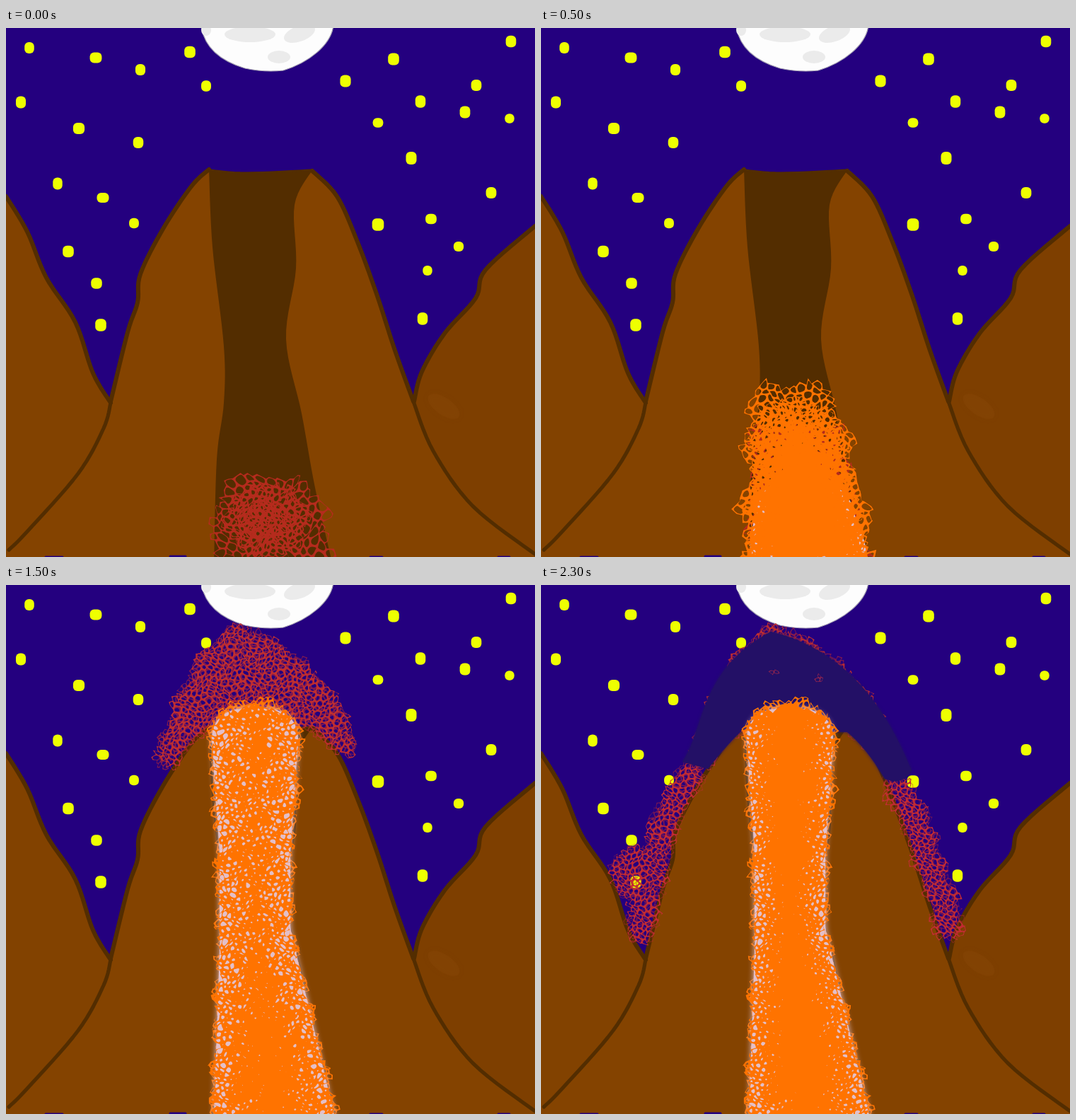
Recreate the animation shown at these times as an HTML page with a canvas. Size 748x748 px, loop 2.5 s.

```html
<!DOCTYPE html>
<html lang="en">
<head>
<meta charset="utf-8">
<title>Volcano</title>
<style>
  html, body { margin: 0; width: 100%; height: 100%; overflow: hidden; background: #24007f; }
  canvas { display: block; width: 748px; height: 748px; }
</style>
</head>
<body>
<canvas id="stage" width="748" height="748"></canvas>
<script>
const SIZE = 748, HOLD = 500;
const SKY = '#24007f', ORANGE = '#ff7300', RED = '#b52b1d', PALE = '#e3bfc8', DARK = '#532d00';
let ctx;

const clamp = (v, lo = 0, hi = 1) => Math.min(hi, Math.max(lo, v));
const hash = (x, y, seed = 0) => {
  const v = Math.sin(x * 12.9898 + y * 78.233 + seed * 37.719) * 43758.5453;
  return v - Math.floor(v);
};
const parse = s => s.split(' ').map(p => p.split(',').map(Number));

// Catmull-Rom curve through a few key points
function spline(s, steps = 8) {
  const p = parse(s), out = [p[0]];
  for (let i = 0; i < p.length - 1; i++) {
    const [a, b, c, d] = [p[i - 1] || p[i], p[i], p[i + 1], p[i + 2] || p[i + 1]];
    for (let j = 1; j <= steps; j++) {
      const t = j / steps;
      out.push([0, 1].map(k => b[k] + t / 2 * (c[k] - a[k] +
        t * (2 * a[k] - 5 * b[k] + 4 * c[k] - d[k] + t * (3 * (b[k] - c[k]) + d[k] - a[k])))));
    }
  }
  return out;
}

function trace(pts, path = new Path2D()) {
  pts.forEach((p, i) => i ? path.lineTo(...p) : path.moveTo(...p));
  return path;
}

// Closed curve rounded through the midpoints of its sides
function round(pts, path) {
  const mid = (a, b) => [(a[0] + b[0]) / 2, (a[1] + b[1]) / 2];
  path.moveTo(...mid(pts[pts.length - 1], pts[0]));
  pts.forEach((p, i) => path.quadraticCurveTo(...p, ...mid(p, pts[(i + 1) % pts.length])));
  path.closePath();
}

function ellipse(x, y, rx, ry, turn = 0) {
  const path = new Path2D();
  path.ellipse(x, y, rx, ry, turn, 0, 7);
  return path;
}

function fill(path, color, blur = 0) {
  ctx.save();
  ctx.fillStyle = ctx.shadowColor = color;
  ctx.shadowBlur = blur;
  ctx.fill(path);
  ctx.restore();
}

function line(path, color, width) {
  ctx.strokeStyle = color;
  ctx.lineWidth = width;
  ctx.stroke(path);
}

// Irregular net of bubbles; hole is the size of the openings, 0 (solid) to 1
function foam(inside, r, color, hole, seed = 1) {
  const net = new Path2D(), w = r * Math.sqrt(3);
  for (let row = 0; row * r * 1.5 < SIZE + r; row++) {
    for (let col = 0; col * w < SIZE + w; col++) {
      const x = (col + row % 2 / 2) * w, y = row * r * 1.5;
      if (!inside(x, y)) continue;
      const corners = [];
      for (let i = 0; i < 6; i++) {
        const a = (i + .5) * Math.PI / 3;
        const vx = x + r * Math.cos(a), vy = y + r * Math.sin(a);
        const kx = Math.round(vx * 2 + .13), ky = Math.round(vy * 2 + .13);
        corners.push([
          vx + r * (hash(kx, ky, seed) - .5 + .8 * Math.sin(vy / r * .6 + vx / r * .25 + seed)),
          vy + r * (hash(kx, ky, seed + 9) - .5 + .8 * Math.sin(vx / r * .55 - vy / r * .2 + seed))
        ]);
      }
      trace(corners, net);
      net.closePath();
      const k = typeof hole === 'number' ? hole : hole(x, y, hash(col, row, seed + 4));
      if (k <= .08) continue;
      const [cx, cy] = [0, 1].map(i => corners.reduce((sum, p) => sum + p[i], 0) / 6);
      round(corners.map(p => [cx + (p[0] - cx) * k, cy + (p[1] - cy) * k]), net);
    }
  }
  ctx.fillStyle = color;
  ctx.fill(net, 'evenodd');
}

const within = path => (x, y) => ctx.isPointInPath(path, x, y);
const along = (path, width) => (x, y) => {
  ctx.lineWidth = width;
  return ctx.isPointInStroke(path, x, y);
};

// Lava column: a middle line, a half width and a domed top
const middle = y => 352 + Math.max(0, y - 480) * .1;
const half = y => 50 + 11 * clamp((380 - y) / 160) + Math.max(0, y - 490) * .135;
const spread = (x, y) => Math.abs(x - middle(y)) / half(y);
const dome = t => (1 - (1 - clamp(t)) ** 2.5) ** .4;
const reach = (y, top, grow) =>
  (half(y) + grow * (.6 + .4 * Math.sin(y / 15))) * dome((y - top) / 48);
const lava = (top, grow = 0) => (x, y) => y > top && Math.abs(x - middle(y)) < reach(y, top, grow);

function lavaPath(top, grow = 0) {
  const left = [], right = [];
  for (let y = top; y < SIZE + 20; y += 3) {
    left.unshift([middle(y) - reach(y, top, grow), y]);
    right.push([middle(y) + reach(y, top, grow), y]);
  }
  return trace([...right, ...left]);
}

const stars = parse('33,28 127,42 190,59 260,34 283,82 21,105 103,142 187,162 73,220 137,240 ' +
  '181,276 88,316 128,361 134,420 480,75 548,44 586,104 526,134 573,184 649,119 665,81 714,19 ' +
  '712,128 686,233 601,270 526,278 640,309 596,343 589,411');

const ridges = [
  spline('0,238 30,288 57,353 98,416 123,488 148,530'),
  spline('577,528 588,486 620,432 664,382 678,342 748,280')
];
const slopes = [
  spline('148,528 172,430 186,388 190,348 222,284 262,224 287,200'),
  spline('433,202 468,238 496,300 524,376 550,456 576,528')
];
const feet = [
  spline('148,530 138,566 102,630 30,712 4,738'),
  spline('576,528 604,598 660,676 748,744')
];
const walls = [
  spline('287,201 292,310 308,450 308,530 298,610 294,760'),
  spline('433,201 408,250 410,340 396,440 418,545 437,650 462,760')
];
const rim = spline('287,201 340,205 433,201');

function scenery() {
  fill(trace([[0, 0], [SIZE, 0], [SIZE, SIZE], [0, SIZE]]), SKY);
  for (const [x, y] of stars) {
    const w = 13 + 4 * hash(x, y, 1), h = 13 + 5 * hash(x, y, 2), star = new Path2D();
    star.roundRect(x - w / 2, y - h / 2, w, h, 6);
    fill(star, '#eeff00');
  }

  const moon = new Path2D('M276 -4C280 30 308 48 338 57Q366 63 392 60C428 49 460 24 463 -4Z');
  fill(moon, '#fdfdfd');
  line(moon, '#a8a4b4', 1.2);
  [ellipse(345, 9, 36, 11), ellipse(415, 8, 23, 11, -.35), ellipse(386, 41, 16, 9), ellipse(283, 3, 7, 8)]
    .forEach(crater => fill(crater, '#ebebeb'));

  fill(trace([...ridges[0], [148, SIZE], [0, SIZE]]), '#824200');
  fill(trace([...ridges[1], [SIZE, SIZE], [577, SIZE]]), '#7e3f00');
  fill(ellipse(619, 535, 26, 12, .6), 'rgba(138,74,12,.3)', 8);
  fill(trace([...slopes[0], ...rim, ...slopes[1], ...feet[1], [SIZE, SIZE], [0, SIZE], ...[...feet[0]].reverse()]), '#844300');
  fill(trace([...rim, ...walls[1], ...[...walls[0]].reverse()]), DARK);

  [...ridges, ...slopes].forEach(edge => line(trace(edge), DARK, 6));
  feet.forEach(edge => line(trace(edge), DARK, 5.2));
  line(trace(rim), DARK, 3);
  line(new Path2D('M56 748h24M232 747h22M515 748h17M696 748h16'), SKY, 3);
}

function smolder() {
  foam(lava(632), 7, RED, (x, y, n) => .74 + n * .14, 2);
  [52, 30].forEach((r, i) =>
    foam(within(ellipse(369, 695, r * 1.15, r)), 5 - i, RED, (x, y, n) => .6 + n * .25, 5 + i));
}

function rise() {
  foam((x, y) => y > 560 && lava(502)(x, y), 6, RED, .7, 3);
  fill(lavaPath(640, -6), PALE);
  const heat = y => clamp((y - 522) / 100, 0, 1.5);
  const edge = (x, y) => 1.15 - spread(x, y);
  foam(lava(500, 14), 6.4, ORANGE, (x, y, n) => .84 - heat(y) * edge(x, y) * .75 - n * .08, 6);
  foam(lava(525, 3), 4.4, ORANGE, (x, y, n) => .85 - heat(y) * edge(x, y) * .9 + (n - .5) * .4, 9);
}

function climb() {
  const head = top => (x, y) => y < 465 && lava(top, 5)(x, y);
  foam(head(290), 6.2, RED, .72, 3);
  foam(head(297), 6, ORANGE, (x, y, n) => .58 + spread(x, y) * .2 + n * .08, 5);
  foam(head(310), 4.3, ORANGE, (x, y, n) => .35 + spread(x, y) * .5 + n * .15, 7);

  fill(lavaPath(446), PALE, 7);
  const fringe = (x, y) => spread(x, y) > 1;
  const low = y => clamp((y - 530) / 150);
  foam(lava(450, 11), 5.4, ORANGE, (x, y, n) => {
    const u = spread(x, y);
    return fringe(x, y) ? .74 : .15 + u * .35 + (n - .3) * .5 - low(y) * (1.15 - u) * .5;
  }, 6);
}

function burst() {
  const cloud = within(new Path2D('M209 250C235 180 255 100 325 54C420 88 472 150 498 230L488 245Q455 228 433 206L287 202Q258 228 228 262Z'));
  foam(cloud, 5, '#c03030', (x, y, n) => .7 + n * .16, 4);
  foam(cloud, 4.2, 'rgba(190,42,48,.62)', .76, 11);
}

function pillar(hole) {
  foam(lava(163, 4), 5, ORANGE, .68, 2);
  fill(lavaPath(173), PALE, 8);
  foam(lava(172, 4), 4.6, ORANGE, (x, y, n) => spread(x, y) > 1.02 ? .6 : hole(spread(x, y), y, n), 7);
}

function erupt() {
  burst();
  pillar((u, y, n) => .08 + u * .42 + (n - .35) * .75 - clamp((y - 530) / 110) * (1.1 - u) * .45);
}

function cool() {
  burst();
  const streams = [
    along(new Path2D('M212 266L176 330L156 410L140 488'), 40),
    within(ellipse(126, 408, 27, 38)),
    along(new Path2D('M504 288L528 330L550 400L573 458L576 484'), 40)
  ];
  const flow = (x, y) => streams.some(inside => inside(x, y));
  foam(flow, 4.8, '#c42c34', (x, y, n) => .72 + n * .14, 4);
  foam(flow, 4.2, 'rgba(190,42,48,.5)', .8, 11);

  fill(new Path2D('M200 250C232 205 222 120 325 66C425 90 485 165 524 262Q512 284 486 274Q460 230 433 208L287 203Q262 226 236 260Z'), '#231066', 4);
  [[327, 121], [391, 135]].forEach(([x, y]) => foam(within(ellipse(x, y, 4, 4)), 3.5, '#8f2450', .75));

  pillar((u, y, n) => {
    const waist = Math.exp(-(((y - 460) / 70) ** 2));
    return u * .95 - .66 + n * .5 + waist * .2 + clamp((y - 680) / 70) * .15;
  });
}

const frames = [smolder, rise, climb, erupt, cool].map(scene => {
  const sheet = document.createElement('canvas');
  sheet.width = sheet.height = SIZE;
  ctx = sheet.getContext('2d');
  ctx.lineCap = ctx.lineJoin = 'round';
  scenery();
  scene();
  return sheet;
});

const stage = document.getElementById('stage').getContext('2d');
const start = performance.now();
let shown = -1;

function tick() {
  const i = Math.floor((performance.now() - start) / HOLD) % frames.length;
  if (i !== shown) stage.drawImage(frames[shown = i], 0, 0);
  requestAnimationFrame(tick);
}
tick();
</script>
</body>
</html>
```
